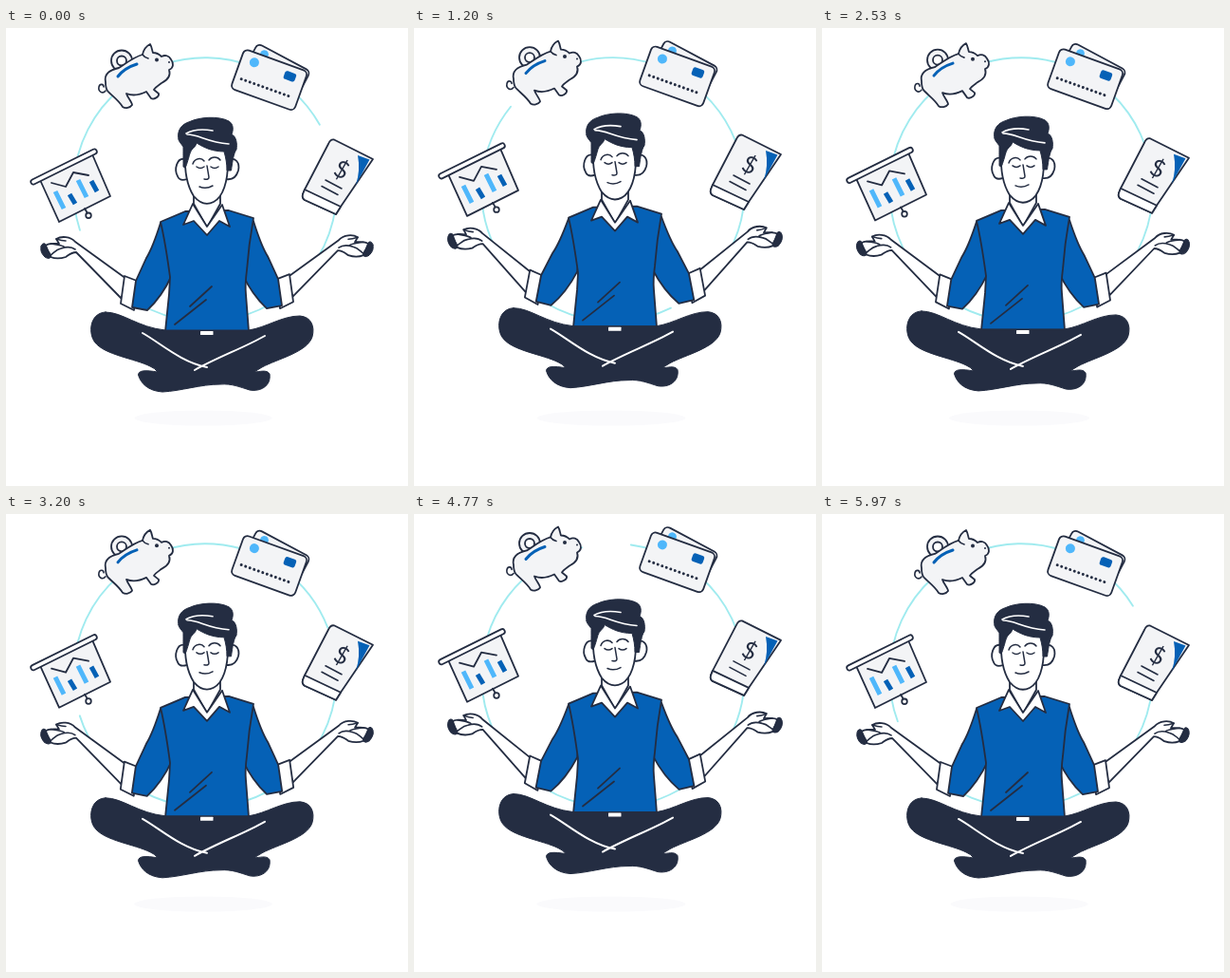
Write an HTML page with a canvas that moves like this. It is 424 by 482 pixels and loops after 6.01 s.

```html
<!DOCTYPE html>
<html lang="en">
<head>
<meta charset="utf-8">
<title>Balance</title>
<style>
  html, body { margin: 0; width: 100%; height: 100%; overflow: hidden; background: #fff; }
  canvas { display: block; width: 424px; height: 482px; }
</style>
</head>
<body>
<canvas id="stage"></canvas>
<script>
const W = 424, H = 482, LOOP = 6010;
const NAVY = '#242d42', BLUE = '#0561b6', SKY = '#4fb7fb', PAPER = '#f3f4f6', WHITE = '#fff';
const canvas = document.getElementById('stage');
const ctx = canvas.getContext('2d');
const dpr = window.devicePixelRatio || 1;
canvas.width = W * dpr;
canvas.height = H * dpr;

const cache = new Map();
function path(d) {
  if (!cache.has(d)) cache.set(d, new Path2D(d));
  return cache.get(d);
}

function shape(d, fill, stroke = NAVY, width = 1.8) {
  const p = path(d);
  if (fill) { ctx.fillStyle = fill; ctx.fill(p); }
  if (stroke) { ctx.strokeStyle = stroke; ctx.lineWidth = width; ctx.stroke(p); }
}

function line(d, color = NAVY, width = 1.8) { shape(d, null, color, width); }

function disc(x, y, r, fill, stroke) {
  ctx.beginPath();
  ctx.arc(x, y, r, 0, Math.PI * 2);
  if (fill) { ctx.fillStyle = fill; ctx.fill(); }
  if (stroke) { ctx.strokeStyle = stroke; ctx.lineWidth = 1.8; ctx.stroke(); }
}

function box(x, y, w, h, r, fill, stroke) {
  ctx.beginPath();
  ctx.roundRect(x, y, w, h, r);
  ctx.fillStyle = fill;
  ctx.fill();
  if (stroke) { ctx.strokeStyle = stroke; ctx.lineWidth = 1.8; ctx.stroke(); }
}

function at(x, y, deg, draw) {
  ctx.save();
  ctx.translate(x, y);
  ctx.rotate(deg * Math.PI / 180);
  draw();
  ctx.restore();
}

function ring(turn) {
  const arc = (a, b) => {
    const rad = v => (v + turn - 90) * Math.PI / 180;
    ctx.beginPath();
    ctx.arc(210, 170, 138.8, rad(a), rad(b));
    ctx.stroke();
  };
  ctx.strokeStyle = '#a0ebef';
  ctx.lineWidth = 1.9;
  arc(82, 237);
  arc(252, 420.5);
}

function shadow(lift) {
  ctx.beginPath();
  ctx.ellipse(208, 410.5, 72.5 + 6.5 * lift, 8, 0, 0, Math.PI * 2);
  ctx.fillStyle = '#fafafc';
  ctx.fill();
}

function chart() {
  shape('M36 160L91 133L110 177L56 204Z', PAPER);
  at(61, 146, -26.3, () => box(-38.5, -2.7, 77, 5.4, 2.7, WHITE, NAVY));
  line('M48 163L63 167L71 152L87 155');
  ctx.lineCap = 'butt';
  line('M52 172L61 190M76 160L85 178', SKY, 5);
  line('M67 175L73 185M90 161L96 172', BLUE, 5);
  ctx.lineCap = 'round';
  line('M83 190L86 195');
  disc(87, 197.3, 2.8, WHITE, NAVY);
}

function pig() {
  disc(122, 34.5, 11, PAPER, NAVY);
  disc(122, 34.5, 5, WHITE, NAVY);
  shape('M105 57C103 48 110 44 119 42C128 36 136 30 144 28C145 23 148 19 152 17C154 20 154 24 155 26' +
    'C159 26 162 28 164 30C168 28 172 29 174 33C177 37 177 42 172 44C174 50 170 55 164 58' +
    'C160 61 157 63 156 65L161 69C162 72 156 76 153 74L148 67C140 71 132 71 127 69' +
    'C128 73 133 78 133 81C131 84 126 85 123 83C119 76 110 70 107 66C105 63 105 61 105 57Z', PAPER);
  line('M118 51Q125 42 138 38', BLUE, 3);
  line('M144 28Q146 31 150 32M105 66C102 70 97 67 98 62C99 58 103 59 103 62', NAVY, 1.6);
  disc(159, 33.5, 2, NAVY);
  disc(172, 36, 1, NAVY);
}

function cards() {
  at(283.5, 49.5, 28, () => {
    box(-31.5, -21, 63, 42, 5, PAPER, NAVY);
    disc(-20, -14, 4.5, SKY);
  });
  at(277.6, 54.7, 19.8, () => {
    box(-35.5, -22, 71, 44, 5, PAPER, NAVY);
    disc(-21, -12, 5, SKY);
    box(13, -15.5, 12.5, 9, 2.5, BLUE);
    for (let i = 0; i < 12; i++) disc(-28 + i * 4.8, 9, 1.5, NAVY);
  });
}

function book() {
  shape('M346 117.5L387 138L353 188L348 196L315 181Q312 179 313 175L315 170L340 122Q342 117 346 117.5Z', PAPER);
  shape('M315 170L353 188L348 196L315 181Q312 179 313 175Z', WHITE);
  shape('M371 134L383.5 138.5L369 165Q374 150 371 134Z', BLUE, null);
  line('M337 160L354 169M333 166.5L350 175.5', NAVY, 1.6);
  at(353.5, 150, 26, () => {
    ctx.font = '400 25px Lato, "Open Sans", sans-serif';
    ctx.textAlign = 'center';
    ctx.textBaseline = 'middle';
    ctx.fillStyle = NAVY;
    ctx.fillText('$', 0, 0);
  });
}

// Left arm; the right one is its mirror image.
function arm(lift) {
  ctx.save();
  ctx.translate(165, 205);
  ctx.rotate(0.054 * lift);
  ctx.translate(-165, -205);
  shape('M73 225L127 264L122 285L74 236C69 236 66 239 63 241C57 243 52 243 47 241L42 229C45 226 50 227 56 227' +
    'L53 222C58 219 68 219 73 225Z', WHITE);
  line('M47 227C52 228 57 228 61 230M47 239C51 236 53 233 58 232C64 230 69 230 73 233M53 222Q59 224 63 224', NAVY, 1.6);
  shape('M37 230C38 226 41 226 42 228C42 233 47 236 47.5 240C47 243 44 243 41 241C38 238 36 235 37 230Z', NAVY, NAVY, 1);
  shape('M125 261L138 266L135 297L121 290Z', WHITE);
  shape('M163 205C157 224 153 234 148 242L137 266L133 294L149 297C160 287 169 273 175 260L178 208Z', BLUE);
  ctx.restore();
}

function arms(lift) {
  arm(lift);
  ctx.save();
  ctx.translate(W, -1.8);
  ctx.scale(-1, 1);
  arm(lift);
  ctx.restore();
}

function torso() {
  shape('M163 204L189 193L235 192L261 200Q256 228 254 255Q252 270 253 280L256 319L168 319L172 280L173 262Q168 225 163 204Z', BLUE);
  line('M217 272L194 293M211 286L178 312');
}

function legs() {
  shape('M105 299C123 299 139 315 168 318L256 318C275 315 291 303 310 303C322 304 326 314 323 325' +
    'C318 341 287 348 270 357Q265 360 262 362C267 362 275 359 278 364C280 377 268 383 257 381' +
    'C247 378 238 374 226 375C205 375 185 382 165 383C150 382 142 374 139.5 365C140 360 147 360 160 362' +
    'Q157 358 152 356C136 348 104 344 94 331C87 323 87 300 105 299Z', NAVY, NAVY, 1);
  box(205, 319, 13.5, 4, 0.5, WHITE);
  line('M144 321C162 331 185 352 212 357M273 324C252 336 222 347 199 360', WHITE, 2);
}

function head() {
  shape('M198 176L198 185L212 210L226 185L226 174Z', WHITE);
  shape('M197 185L187 207L198 203L212 218L225 203L236 209L228 186L212 209Z', WHITE);
  shape('M189 138C180 136 177 149 181 156C183 161 188 160 191 159Z', WHITE);
  shape('M234 139C242 135 247 142 245 150C243 157 238 160 232 159Z', WHITE);
  shape('M189 132C188 152 191 166 198 177C204 184 211 187 219 183C229 178 234 161 234 142L230 120L196 115Z', WHITE);
  shape('M182 117C180 108 185 101 194 98.5C203 94 224 92 235 98C240 101 240 107 238 112' +
    'C243 114 244 122 243 128C240 132 239 140 237.5 150L233 150C233 143 232 137 230 130' +
    'C218 130 209 126 201 121C200 126 195 127 194 132C192 139 190 146 189 147L187 146' +
    'C187 137 187 131 187 125C184 121 182 119 182 117Z', NAVY, NAVY, 1);
  line('M190 111C197 107 207 106 218 108M191 112C204 112 211 120 235 122', WHITE, 1.6);
  line('M197 143C199 137 206 136 209 140M214 139C217 135 223 135 226 139' +
    'M201 146Q205 149 209 146M216 146Q220 149 224 146M212 145L214 157Q214 160 209 159M204 167Q211 170 218 166', NAVY, 1.5);
}

function raised(amount, draw) {
  ctx.save();
  ctx.translate(0, -amount);
  draw();
  ctx.restore();
}

function render(ms) {
  const p = (ms % LOOP) / LOOP;
  const lift = (1 - Math.cos(p * 4 * Math.PI)) / 2;
  ctx.setTransform(dpr, 0, 0, dpr, 0, 0);
  ctx.fillStyle = WHITE;
  ctx.fillRect(0, 0, W, H);
  ctx.lineJoin = 'round';
  ctx.lineCap = 'round';
  shadow(lift);
  ring(p * 360);
  raised(6.8 * lift, chart);
  raised(3.8 * lift, pig);
  raised(4.2 * lift, cards);
  raised(5.5 * lift, book);
  raised(4.8 * lift, () => {
    arms(lift);
    torso();
    legs();
    head();
  });
}

const start = performance.now();
function tick() {
  render(performance.now() - start);
  requestAnimationFrame(tick);
}
tick();
</script>
</body>
</html>
```
